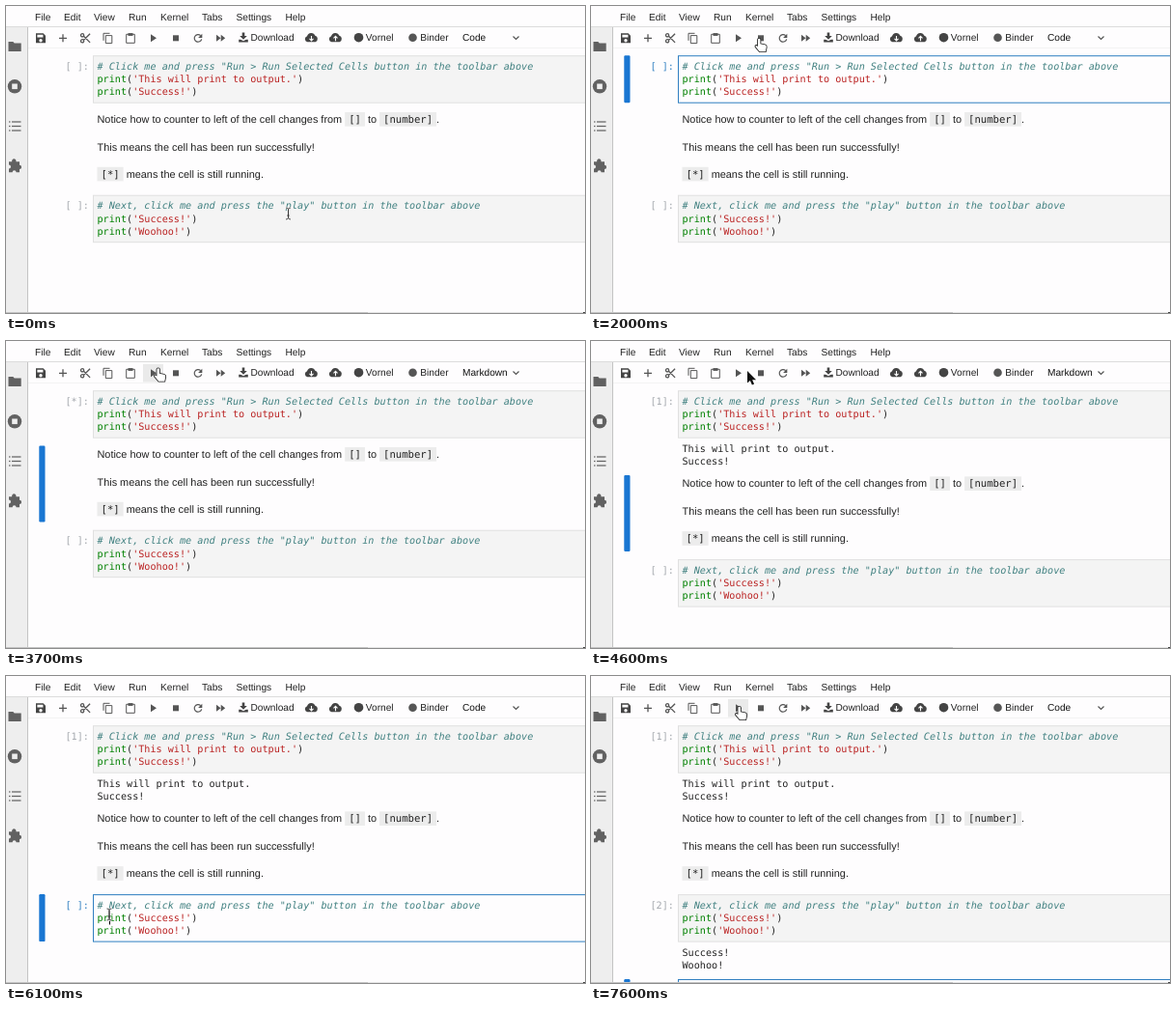
Write an HTML page with a canvas that moves like this. It is 600 px wide and 318 px high and loops after 8500 ms.

```html
<!DOCTYPE html>
<html lang="en">
<head>
<meta charset="utf-8">
<title>Running notebook cells</title>
<style>
html, body { margin: 0; width: 100%; height: 100%; overflow: hidden; background: #fefdfe; }
canvas { display: block; }
</style>
</head>
<body>
<canvas id="stage" width="600" height="318"></canvas>
<script>
const ctx = document.getElementById('stage').getContext('2d');
ctx.textRendering = 'geometricPrecision';

const LOOP = 8500, STEP = 100;
const SANS = '"Liberation Sans", Arial, sans-serif';
const MONO = '"DejaVu Sans Mono", monospace';
const UI = '10.13px ' + SANS, PROSE = '10.9px ' + SANS;
const CODE = '10.155px ' + MONO, NOTE = 'italic ' + CODE, INLINE = '10.6px ' + MONO;
const PAPER = '#fefdfe', INK = '#212121', ICON = '#555', SIDE = '#616161';
const BLUE = '#1976d2', EDGE = '#307fc1';
const LINE = 13.2, SHIFT = 30.4;

// Pointer path: time, x, y, shape kept until the next point
const PATH = [
  [0, 292.5, 215, 'beam'], [200, 284, 175, 'arrow'], [500, 250, 62, 'beam'],
  [700, 243, 76, 'beam'], [1000, 243, 76, 'beam'], [1100, 235, 46, 'arrow'],
  [1300, 212, 8, 'arrow'], [1400, 212, 8, 'arrow'], [1700, 199, 30, 'hand'],
  [1900, 174, 34, 'hand'], [2000, 174, 34, 'hand'], [2100, 160, 24, 'arrow'],
  [2300, 133, 7, 'arrow'], [2600, 133, 7, 'arrow'], [2900, 150, 30, 'arrow'],
  [3200, 134, 36, 'arrow'], [3400, 152, 30, 'hand'], [3500, 157.5, 28.5, 'hand'],
  [4000, 157.5, 28.5, 'hand'], [4100, 156.5, 28.5, 'hand'], [4500, 156.5, 28.5, 'hand'],
  [4600, 162, 31, 'arrow'], [4700, 162, 31, 'arrow'], [5000, 76, 68, 'arrow'],
  [5300, 123, 171, 'arrow'], [5600, 107, 238, 'arrow'], [5700, 107, 247, 'beam'],
  [6200, 107, 247, 'beam'], [6400, 114, 212, 'arrow'], [6700, 136, 125, 'arrow'],
  [6900, 145.5, 77, 'beam'], [7000, 150, 50, 'arrow'], [7100, 153, 36, 'hand'],
  [7200, 153.5, 32, 'hand'], [LOOP, 153.5, 32, 'hand']
];

const MENUS = [['File', 30], ['Edit', 60], ['View', 91], ['Run', 127], ['Kernel', 160],
  ['Tabs', 203], ['Settings', 238.5], ['Help', 289.5]];

const ITEMS = [['Run Selected Cells', 33.3, 'Shift+Enter'],
  ['Run Selected Cells and Insert Below', 58.7, 'Alt+Enter'],
  ["Run Selected Cells and Don't Advance", 77.6, 'Ctrl+Enter'],
  ['Run Selected Text or Current Line in Console', 96.6],
  ['Run All Above Selected Cell', 122], ['Run Selected Cell and All Below', 141],
  ['Render All Markdown Cells', 166.6], ['Run All Cells', 192],
  ['Restart Kernel and Run All Cells…', 211]];

const CLOUD = 'M-4.2 4.2a3.1 3.1 0 0 1-.3-6a4.4 4.4 0 0 1 8.4-.4a3.4 3.4 0 0 1 .4 6.4z';

function rect(x, y, w, h, color) {
  ctx.fillStyle = color;
  ctx.fillRect(x, y, w, h);
}

function text(s, x, y, font = UI, color = INK, align = 'left') {
  ctx.font = font;
  ctx.fillStyle = color;
  ctx.textAlign = align;
  ctx.fillText(s, x, y);
}

function shape(x, y, d, fill, stroke, width = 1, scale = 1) {
  const p = new Path2D(d);
  ctx.save();
  ctx.translate(x, y);
  ctx.scale(scale, scale);
  if (stroke) {
    ctx.strokeStyle = stroke;
    ctx.lineWidth = width;
    ctx.stroke(p);
  }
  if (fill) {
    ctx.fillStyle = fill;
    ctx.fill(p, 'evenodd');
  }
  ctx.restore();
}

function dot(x, y, r, color) {
  ctx.fillStyle = color;
  ctx.beginPath();
  ctx.arc(x, y, r, 0, 7);
  ctx.fill();
}

function pointerAt(t) {
  let i = 0;
  while (i < PATH.length - 2 && PATH[i + 1][0] <= t) i++;
  const [t0, x0, y0, kind] = PATH[i], [t1, x1, y1] = PATH[i + 1];
  const k = (t - t0) / (t1 - t0);
  return { x: x0 + (x1 - x0) * k, y: y0 + (y1 - y0) * k, kind };
}

function drawPointer({ x, y, kind }) {
  if (kind === 'beam') {
    const d = 'M-2.5-6q2.5 0 2.5 1.6v8.8q0 1.6 2.5 1.6M2.5-6q-2.5 0-2.5 1.6v8.8q0 1.6-2.5 1.6M-1.3 2h2.6';
    shape(x, y, d, null, '#fff', 1.8);
    shape(x, y, d, null, '#333', .9);
  } else if (kind === 'arrow') {
    shape(x, y, 'M0 0v12.6l2.9-2.6l2 4.6l2.2-1l-2-4.4h4z', '#111', '#fff', 1.6);
  } else {
    shape(x, y, 'M-1.2 1.2a1.4 1.4 0 0 1 2.8 0v4.6l5.4 1.2q1.9.6 1.6 2.6l-1 5h-6.8l-4.6-5.4q-.6-1.8 1-1.5l1.6 1.2z',
      '#fff', '#222', 1.9, .9);
  }
}

function drawSidebar() {
  rect(0, 22, 22, 296, '#eee');
  rect(22, 22, 1, 296, '#c4c4c4');
  shape(9, 42, 'M-6.5-5h4.8l1.4 1.5h7v8.5h-13.2z', SIDE);
  dot(9, 83.3, 7.2, SIDE);
  rect(6.2, 80.5, 5.6, 5.6, '#eee');
  for (const y of [120, 124.5, 129]) {
    rect(3, y - .6, 1.5, 1.2, SIDE);
    rect(6, y - .6, 9.5, 1.2, SIDE);
  }
  shape(9.5, 164.2, 'M-6.5-3h3.2a2.2 2.2 0 1 1 4.2 0h3.6v3.6a2.1 2.1 0 1 1 0 4.2v3.2h-3.4a2 2 0 1 0-4 0h-3.6v-3.6a2 2 0 1 0 0-4z', SIDE);
}

function drawToolbar(kind, overPlay) {
  rect(23, 43, 577, 1, '#f3f3f3');
  if (overPlay) rect(142, 24, 21, 18.5, '#eaeaea');
  const y = 33.3;
  shape(36, y, 'M-5-5h7.6l2.4 2.4v7.6h-10zM-3.6-3.6v2.8h6v-2.8zM-1.7 2.4a1.7 1.7 0 1 0 3.4 0a1.7 1.7 0 1 0-3.4 0', '#444');
  shape(59, y, 'M-4 0h8M0-4v8', null, ICON, 1.3);
  shape(82.5, y, 'M-5-3a1.6 1.6 0 1 0 3.2 0a1.6 1.6 0 1 0-3.2 0M-5 3a1.6 1.6 0 1 0 3.2 0a1.6 1.6 0 1 0-3.2 0M-2-2l6.6 6.6M-2 2l6.6-6.6', null, ICON, 1.3);
  shape(105.5, y, 'M-4.5 2.5v-7.5h6.5M-2.2-2.7h6.5v8h-6.5z', null, ICON);
  shape(129, y, 'M-4.3-4h8.6v9h-8.6z', null, ICON);
  rect(126.5, y - 5.2, 5, 2.8, ICON);
  shape(152.5, y, 'M-2.5-4l6 4l-6 4z', ICON);
  rect(173, y - 3, 6, 6, ICON);
  shape(199, y, 'M2.7-2.6a3.8 3.8 0 1 0 1 3.6', null, ICON, 1.2);
  shape(199, y, 'M4.3-4.6v4.2h-4.2z', ICON);
  shape(222.5, y, 'M-4.5-3.5l4.5 3.5l-4.5 3.5zM.2-3.5l4.5 3.5l-4.5 3.5z', ICON);
  shape(246, 32.5, 'M-1.3-5h2.6v3.4h2.5l-3.8 3.8l-3.8-3.8h2.5zM-4.8 2.2h2l2.8 1.6l2.8-1.6h2v2.8h-9.6z', '#444');
  text('Download', 253.5, 36.3);
  for (const [x, dir] of [[316.5, 1], [341.5, -1]]) {
    shape(x, 33, CLOUD, '#444');
    shape(x, 33.6, `M0 ${-2.6 * dir}v${4.4 * dir}M-2 ${.3 * dir}l2 ${2 * dir}l2 ${-2 * dir}`, null, '#fff', 1.1);
  }
  dot(365.5, 32.7, 4.8, '#444');
  text('Vornel', 372.8, 36.3);
  dot(421.5, 32.7, 4.3, '#555');
  text('Binder', 429.3, 36.3);
  text(kind, 473, 36.3, UI, '#111');
  shape(528.5, 33, 'M-3-1.5l3 3l3-3', null, ICON, 1.2);
}

function drawMenuBar(open) {
  rect(0, 0, 600, 21, PAPER);
  rect(0, 21, 600, 1, '#dcdcdc');
  if (open) {
    rect(120.5, 0, 1, 22, '#ddd');
    rect(151, 0, 1, 22, '#ddd');
  }
  for (const [name, x] of MENUS) text(name, x, 15);
}

function drawRunMenu(pointer) {
  ctx.save();
  ctx.shadowColor = 'rgba(0,0,0,.35)';
  ctx.shadowBlur = 5;
  ctx.shadowOffsetY = 1;
  rect(121, 21, 319, 203, PAPER);
  ctx.restore();
  ctx.strokeStyle = '#bdbdbd';
  ctx.lineWidth = 1;
  ctx.strokeRect(121, 20.5, 318.5, 203);
  for (const y of [46, 109.3, 154, 179.3]) rect(121.5, y - .4, 318, .8, '#ddd');
  for (const [label, y, keys] of ITEMS) {
    if (Math.abs(pointer.y - y) < 9.4) rect(121.5, y - 9.4, 317.5, 18.8, '#eee');
    text(label, 143.5, y + 3.6);
    if (keys) text(keys, 422, y + 3.6, UI, INK, 'right');
  }
}

function bar(y, h) {
  ctx.fillStyle = BLUE;
  ctx.beginPath();
  ctx.roundRect(34.3, y, 6.2, h, 1.2);
  ctx.fill();
}

function codeCell(top, mark, note, strings, active, editing) {
  if (active) bar(top, 49);
  ctx.lineWidth = 1;
  ctx.strokeStyle = editing ? EDGE : '#e0e0e0';
  rect(90.5, top + .5, 520, 48.5, editing ? PAPER : '#f4f4f4');
  ctx.strokeRect(90.5, top + .5, 520, 48.5);
  if (!note) return;
  const y = top + 14.7;
  text(`[${mark}]:`, 61.5, y, CODE, active ? EDGE : '#a3a7ad');
  text(note, 94.5, y, NOTE, '#408080');
  strings.forEach((s, i) => {
    let x = 94.5;
    const parts = [['print', '#008000'], ['(', INK], [`'${s}'`, '#ba2121'], [')', INK]];
    for (const [part, color] of parts) {
      text(part, x, y + LINE * (i + 1), CODE, color);
      x += ctx.measureText(part).width;
    }
  });
}

function output(y, lines) {
  lines.forEach((s, i) => text(s, 94.5, y + LINE * i, CODE));
}

// Words in backticks get the inline code look
function prose(s, y) {
  let x = 94.5;
  s.split('`').forEach((part, i) => {
    const code = i % 2;
    ctx.font = code ? INLINE : PROSE;
    const w = ctx.measureText(part).width;
    if (code) {
      rect(x, y - 10.8, w + 8, 14.6, '#ececec');
      text(part, x + 4, y, INLINE);
      x += w + 8;
    } else {
      text(part, x, y, PROSE);
      x += w;
    }
  });
}

function caret(x, y, t, start) {
  if (t >= start && (t - start) % 1060 < 530) rect(x, y, 1, 13, '#000');
}

function draw(t) {
  const pointer = pointerAt(t);
  const menuOpen = t >= 2400 && t < 3200;
  const firstRun = t >= 3700, firstDone = t >= 3800;
  const secondRun = t >= 7400, secondDone = t >= 7500;
  const active = t < 1000 ? '' : !firstRun ? 'first' : t < 5900 ? 'text' : !secondRun ? 'second' : 'new';
  const dy = firstDone ? SHIFT : 0;
  const overPlay = pointer.kind === 'hand' && pointer.x > 142 && pointer.x < 163;

  rect(0, 0, 600, 318, PAPER);
  drawToolbar(active === 'text' ? 'Markdown' : 'Code', overPlay);

  const editFirst = active === 'first' && t < 2400;
  codeCell(51.2, firstDone ? '1' : firstRun ? '*' : ' ',
    '# Click me and press "Run > Run Selected Cells button in the toolbar above',
    ['This will print to output.', 'Success!'], active === 'first', editFirst);
  if (editFirst) caret(243, 70, t, 1000);
  if (firstDone) output(114.8, ['This will print to output.', 'Success!']);

  if (active === 'text') bar(108.5 + dy, 79);
  prose('Notice how to counter to left of the cell changes from `[]` to `[number]`.', 120.8 + dy);
  prose('This means the cell has been run successfully!', 149.5 + dy);
  prose('`[*]` means the cell is still running.', 177.6 + dy);

  codeCell(195.7 + dy, secondDone ? '2' : secondRun ? '*' : ' ',
    '# Next, click me and press the "play" button in the toolbar above',
    ['Success!', 'Woohoo!'], active === 'second', active === 'second');
  if (active === 'second') caret(107, 244.5, t, 5840);
  if (secondDone) output(289.6, ['Success!', 'Woohoo!']);
  if (secondRun) codeCell(secondDone ? 314 : 283.6, ' ', '', [], true, true);

  drawMenuBar(menuOpen);
  drawSidebar();
  rect(0, 317, 375, 1, '#c4c4c4');
  rect(375, 317, 225, 1, '#e4e4e4');
  rect(598, 317, 2, 1, '#444');
  if (menuOpen) drawRunMenu(pointer);
  drawPointer(pointer);
}

const begin = performance.now();
function tick() {
  const t = (performance.now() - begin) % LOOP;
  draw(Math.floor(t / STEP) * STEP);
  requestAnimationFrame(tick);
}
tick();
</script>
</body>
</html>
```
